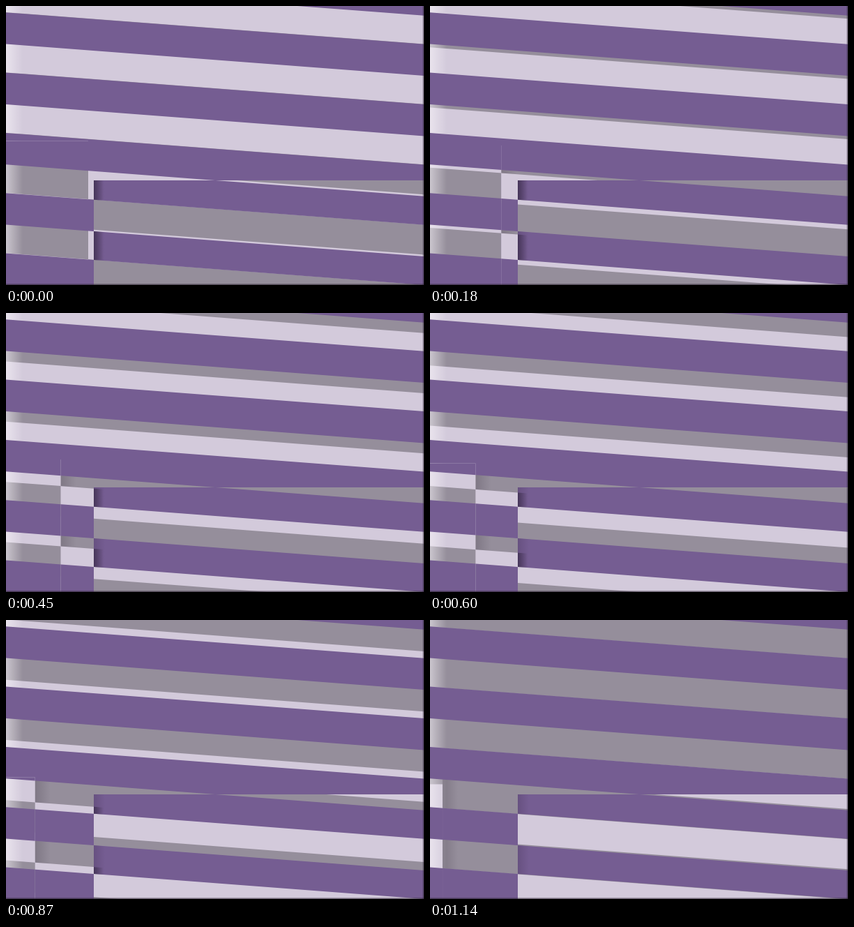
Recreate the animation shown at these times as an HTML page with a canvas. Size 600 by 400 pixels, loop 1.17 s.

```html
<!DOCTYPE html>
<html lang="en">
<head>
<meta charset="utf-8">
<title>Sliding stripes</title>
<style>
  html, body { margin: 0; overflow: hidden; }
  canvas { display: block; }
</style>
</head>
<body>
<canvas id="stage" width="600" height="400"></canvas>
<script>
const ctx = document.getElementById('stage').getContext('2d');
const W = 600, H = 400, LOOP = 1170, STEP = 30;
const SLOPE = 0.0758, PERIOD = 86.3, GAP = 41, TOP = 54.6 - 2 * PERIOD;
const PURPLE = '#755d92', LIGHT = '#d3cadb', GRAY = '#958e9b';
const EDGE_X = 126, EDGE_Y = 250;

function fade(x, width, rgb, alpha) {
  const g = ctx.createLinearGradient(x, 0, x + width, 0);
  g.addColorStop(0, `rgba(${rgb},${alpha})`);
  g.addColorStop(1, `rgba(${rgb},0)`);
  return g;
}

// Repeats one band per period, in coordinates skewed along the stripes.
function bands(offset, height, paint, x = 0, width = W) {
  ctx.fillStyle = paint;
  for (let y = TOP + offset; y < H; y += PERIOD) ctx.fillRect(x, y, width, height);
}

function region(x, y, width, height, draw) {
  ctx.save();
  ctx.beginPath();
  ctx.rect(x, y, width, height);
  ctx.clip();
  ctx.transform(1, SLOPE, 0, 1, 0, 0);
  draw();
  ctx.restore();
}

function tones(shift, back, front) {
  ctx.fillStyle = back;
  ctx.fillRect(0, -60, W, H + 60);
  bands(shift, PERIOD / 2, front);
  ctx.fillStyle = fade(0, 24, '255,252,255', 0.5);
  ctx.fillRect(0, -60, 24, H + 60);
}

function draw(t) {
  const shift = -2.4 + 0.0385 * t;
  const splitX = 118 - 0.0877 * t;
  const splitY = 193.4 + 0.037 * t;
  const purpleGaps = () => bands(GAP, PERIOD - GAP, PURPLE);

  region(0, 0, W, H, () => {
    tones(shift, GRAY, LIGHT);
    purpleGaps();
  });

  region(splitX, 228, EDGE_X - splitX, H, () => {
    bands(0, Math.max(0, Math.min(shift, GAP)), fade(splitX, 22, '40,30,45', 0.2), splitX, 22);
  });

  region(0, splitY, splitX, H, () => {
    tones(shift, LIGHT, GRAY);
    purpleGaps();
  });

  region(EDGE_X, EDGE_Y, W, H, () => {
    tones(shift, GRAY, LIGHT);
    bands(0, GAP, PURPLE);
    bands(0, GAP, fade(EDGE_X, 16, '40,25,50', 0.18), EDGE_X, 16);
    const lit = Math.max(0, shift);
    bands(lit, Math.max(0, GAP - lit), fade(EDGE_X, 14, '30,20,40', 0.45), EDGE_X, 14);
  });

  ctx.fillStyle = 'rgba(40,32,45,.6)';
  ctx.fillRect(0, H - 1.5, W, 1.5);
  ctx.fillRect(W - 1.5, 0, 1.5, H);
}

function frame() {
  draw(Math.floor(performance.now() % LOOP / STEP) * STEP);
  requestAnimationFrame(frame);
}
frame();
</script>
</body>
</html>
```
